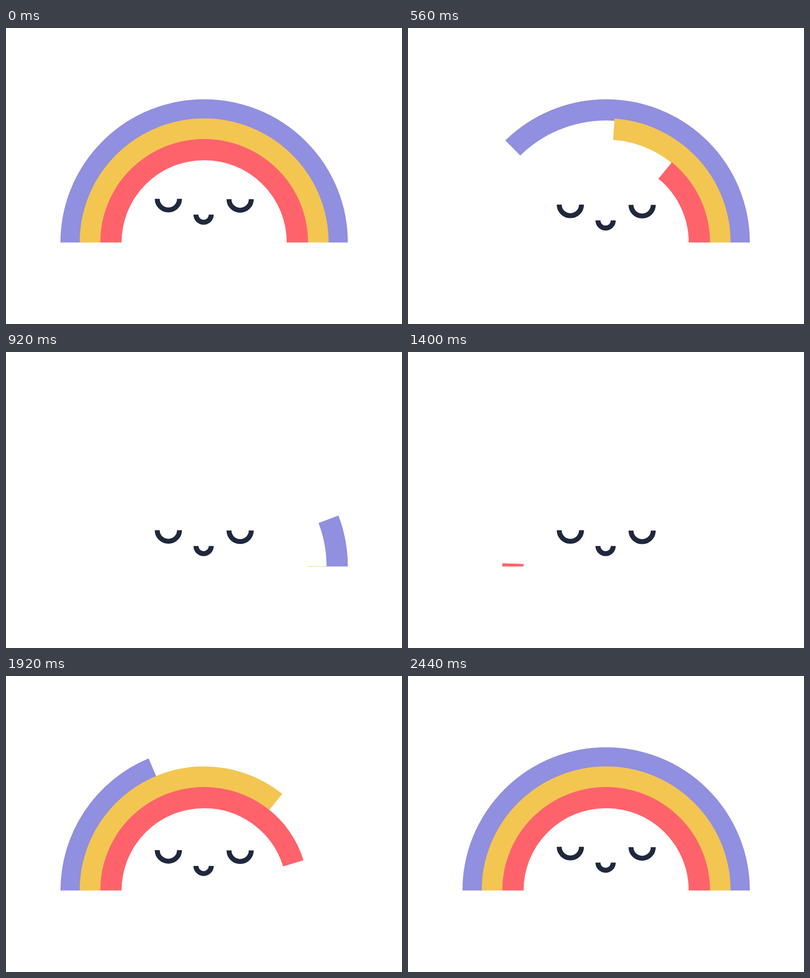
Animation, 800 px wide and 600 px high, one loop 2.52 s. Source, as an HTML page with a canvas:

```html
<!DOCTYPE html>
<html lang="en">
<head>
<meta charset="utf-8">
<title>Sleepy rainbow</title>
<style>
html, body { margin: 0; width: 100%; height: 100%; overflow: hidden; background: #fff; }
canvas { display: block; width: 800px; height: 600px; }
</style>
</head>
<body>
<canvas id="stage" width="800" height="600"></canvas>
<script>
const ctx = document.getElementById('stage').getContext('2d');
const LOOP = 2520, STEP = 40;
const CX = 400.3, CY = 434.7, BAND = 43;
const INK = '#1f283d';

// hide and show: [start, duration] in ms
const bands = [
  { r: 268.8, color: '#918fdf', hide: [303, 783], show: [1622, 718] },
  { r: 229.9, color: '#f3c651', hide: [164, 770], show: [1457, 714] },
  { r: 188.3, color: '#fe636b', hide: [53, 780], show: [1360, 691] }
];
const face = [
  { x: 328, y: 346.3, r: 22.5 },
  { x: 473, y: 346.9, r: 22.5 },
  { x: 399.2, y: 378.3, r: 15.5 }
];
const DROP = 15.1;

const smooth = x => x * x * (3 - 2 * x);
const progress = (t, [start, span]) => Math.min(1, Math.max(0, (t - start) / span));

// Bezier easing with control points (a, 0) and (b, 1)
function ease(x, a, b) {
  let lo = 0, hi = 1;
  for (let i = 0; i < 24; i++) {
    const s = (lo + hi) / 2, q = 1 - s;
    if (3 * q * q * s * a + 3 * q * s * s * b + s * s * s < x) lo = s;
    else hi = s;
  }
  return smooth((lo + hi) / 2);
}

function arc(x, y, r, from, to, width, color) {
  ctx.beginPath();
  ctx.arc(x, y, r, from, to);
  ctx.lineWidth = width;
  ctx.strokeStyle = color;
  ctx.stroke();
}

function draw(t) {
  ctx.fillStyle = '#fff';
  ctx.fillRect(0, 0, 800, 600);

  const showing = t >= 1300;
  for (const b of bands) {
    const from = showing ? 0 : smooth(progress(t, b.hide));
    const to = showing ? smooth(progress(t, b.show)) : 1;
    if (to - from > 0.0003) {
      arc(CX, CY, b.r, Math.PI * (1 + from), Math.PI * (1 + to), BAND, b.color);
    }
  }

  const down = showing
    ? 1 - ease(progress(t, [1360, 1080]), 0.4, 0.55)
    : ease(progress(t, [0, 1080]), 0.34, 0.27);
  for (const f of face) {
    arc(f.x, f.y + DROP * down, f.r, 0, Math.PI, 10, INK);
  }
}

const begin = performance.now();
function tick() {
  const t = (performance.now() - begin) % LOOP;
  draw(Math.floor(t / STEP) * STEP);
  requestAnimationFrame(tick);
}
tick();
</script>
</body>
</html>
```
